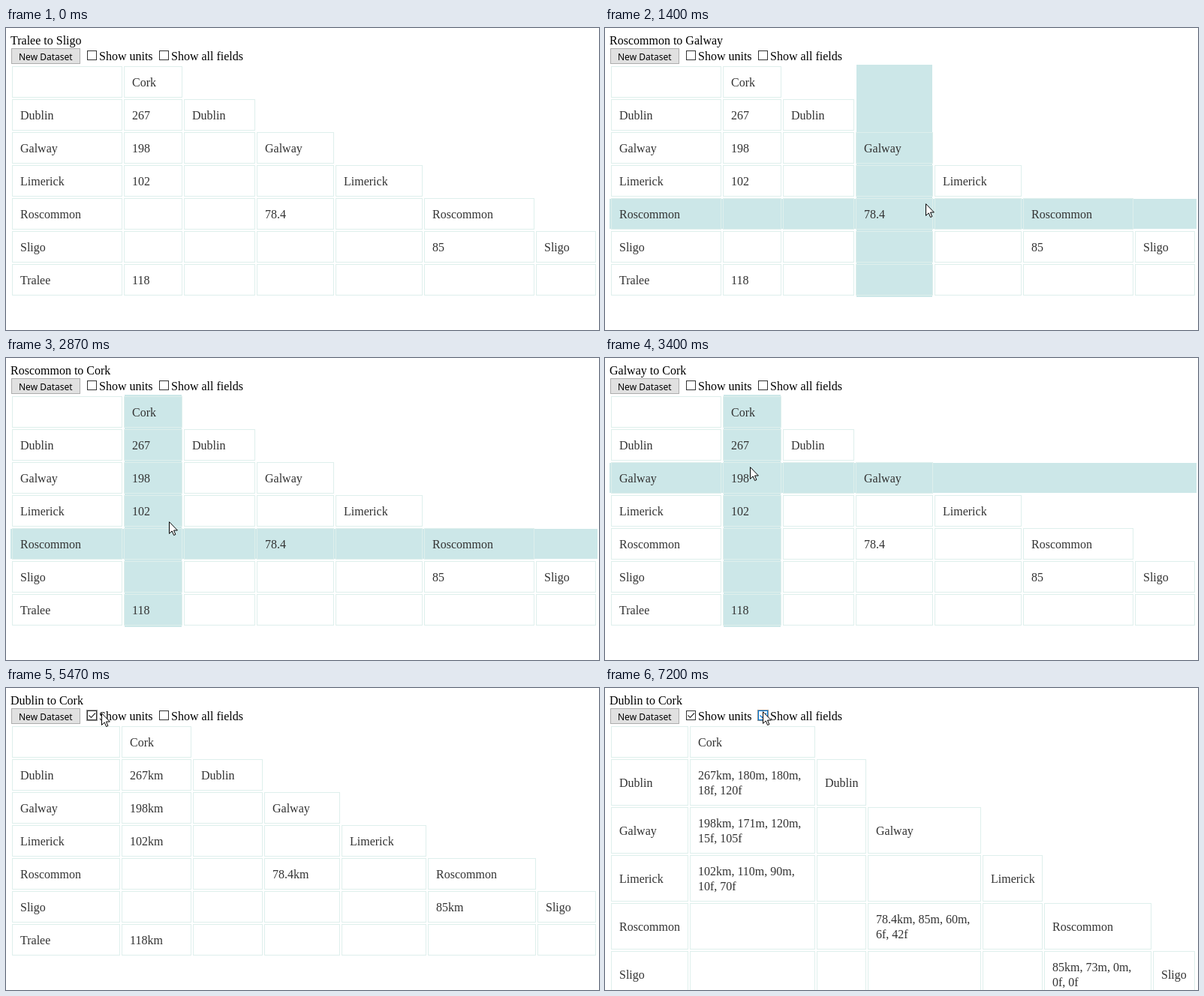
Animation, 790 px wide and 403 px high, one loop 8 s. Source, as an HTML page:

```html
<!DOCTYPE html>
<html lang="en">
<head>
<meta charset="utf-8">
<title>Distance table</title>
<style>
html, body { margin: 0; width: 100%; height: 100%; overflow: hidden; background: #fff; }
svg { display: block; font: 16px "Liberation Serif", "Times New Roman", serif; }
text { white-space: pre; }
.cell { fill: none; stroke: #deefec; }
.label { fill: #333; }
.glow { fill: #cce7e8; }
.button { font: 12px "Noto Sans", sans-serif; }
</style>
</head>
<body>
<svg id="stage" width="790" height="403" viewBox="0 0 790 403"></svg>
<script>
const LOOP = 8000;
const UNITS_PRESS = 4870, UNITS_ON = 4930, FIELDS_PRESS = 7070, FIELDS_ON = 7200;
const towns = ['Cork', 'Dublin', 'Galway', 'Limerick', 'Roscommon', 'Sligo', 'Tralee'];

// Keyed by row,column: short value, then the remaining fields
const distances = {
  '1,1': ['267', ' 180m, 180m,', '18f, 120f'],
  '2,1': ['198', ' 171m, 120m,', '15f, 105f'],
  '3,1': ['102', ' 110m, 90m,', '10f, 70f'],
  '4,3': ['78.4', ' 85m, 60m,', '6f, 42f'],
  '5,5': ['85', ' 73m, 0m,', '0f, 0f'],
  '6,1': ['118', ' 120m, 90m,', '12f, 80f']
};

// Column starts for each view; the last entry is the table's right edge
const views = {
  plain: { cols: [8, 157, 237, 334, 439, 557, 706, 788], height: 42 },
  units: { cols: [8, 154, 249, 344, 447, 562, 708, 788], height: 42 },
  full: { cols: [8, 113, 282, 350, 503, 585, 730, 788], height: 62 }
};
const TOP = 51, GAP = 2;
const rowTop = (view, r) => r ? TOP + 44 + (r - 1) * (view.height + GAP) : TOP;

// Pointer moves: start, end, steps, target x, target y, upward bow
const moves = [
  [530, 670, 3, 576, 75, 0],
  [1070, 1400, 6, 427, 234, 0],
  [1600, 1800, 4, 350, 241, 0],
  [2130, 2470, 6, 222, 240, 0],
  [2870, 3200, 6, 205, 169, 0],
  [3400, 3530, 3, 183, 126, 0],
  [3930, 4070, 3, 147, 50, 0],
  [4130, 4670, 9, 113, 35, 0],
  [5470, 6270, 13, 208, 31, 9],
  [6400, 6470, 2, 210, 31, 0]
];

function dataCellAt(x, y) {
  const { cols, height } = views.plain;
  const c = cols.findIndex((left, i) => i < 7 && x >= left && x < cols[i + 1] - GAP);
  const r = towns.findIndex((_, i) => y >= rowTop(views.plain, i) && y < rowTop(views.plain, i) + height);
  return c >= 1 && r >= c ? { r, c } : null;
}

function buildStates() {
  let title = 'Tralee to Sligo', last = { x: 992, y: 12 };
  const states = [{ t: 0, title, hover: null, visible: false }];
  for (const [start, end, steps, toX, toY, bow] of moves) {
    const from = last;
    for (let i = 0; i < steps; i++) {
      const k = 1 - (1 - (i + 1) / steps) ** 2;
      const x = Math.round(from.x + (toX - from.x) * k);
      const y = Math.round(from.y + (toY - from.y) * k - bow * Math.sin(Math.PI * k) ** 2);
      // Highlighting trails the pointer by one step
      const hover = start < UNITS_ON ? dataCellAt(last.x, last.y) : null;
      if (hover) title = `${towns[hover.r]} to ${towns[hover.c - 1]}`;
      const t = Math.round((start + (end - start) * i / (steps - 1)) / 10) * 10;
      last = { t, x, y, hover, title, visible: true };
      states.push(last);
    }
  }
  return states;
}

const rect = (x, y, w, h, attrs) => `<rect x="${x}" y="${y}" width="${w}" height="${h}" ${attrs}/>`;
const text = (x, y, str, cls = '') => `<text x="${x}" y="${y}" class="${cls}">${str}</text>`;

function cellLines(r, c, mode) {
  if (c === 0) return r ? [towns[r]] : [];
  if (c === r + 1) return [towns[r]];
  const entry = distances[`${r},${c}`];
  if (!entry) return [];
  const [value, rest, second] = entry;
  if (mode === 'plain') return [value];
  return mode === 'units' ? [value + 'km'] : [`${value}km,${rest}`, second];
}

function drawTable(mode, hover) {
  const view = views[mode], { cols } = view;
  let out = '';
  if (hover) {
    const left = cols[hover.c], right = cols[hover.c + 1] - GAP;
    out += rect(6, rowTop(view, hover.r) + 1, 782, view.height - 2, 'class="glow"');
    out += rect(left + 1, 49, right - left - 2, 310, 'class="glow"');
  }
  towns.forEach((_, r) => {
    const y = rowTop(view, r), h = r ? view.height : 42;
    for (let c = 0; c < Math.min(r + 2, 7); c++) {
      const x = cols[c], w = cols[c + 1] - GAP - x;
      out += rect(x + .5, y + .5, w - 1, h - 1, 'class="cell"');
      const lines = cellLines(r, c, mode);
      const base = y + h / 2 + 6 - (lines.length - 1) * 10;
      lines.forEach((line, i) => out += text(x + 11, base + i * 20, line, 'label'));
    }
  });
  return out;
}

function drawCheckbox(x, { checked, pressed, focused, hovered }) {
  const ink = pressed ? '#005499' : hovered ? '#0078d7' : '#333';
  let out = rect(x + .5, 30.5, 12, 12, `fill="${pressed ? '#cce4f7' : '#fff'}" stroke="${ink}"`);
  if (checked) out += `<path d="M${x + 2.5} 36.5l3 3 5.5-6" fill="none" stroke="${ink}" stroke-width="1.2"/>`;
  if (focused) out += rect(x - .5, 29.5, 14, 14, 'fill="none" stroke="#222" stroke-dasharray="1"');
  return out;
}

function drawControls(t, { x, y, visible }) {
  const over = left => visible && x >= left && x < left + 13 && y >= 30 && y < 43;
  return rect(7.5, 27.5, 91, 20, 'fill="#e1e1e1" stroke="#adadad"') +
    text(17, 43, 'New Dataset', 'button') +
    drawCheckbox(108, {
      checked: t >= UNITS_ON, pressed: t >= UNITS_PRESS && t < UNITS_ON,
      focused: t >= UNITS_PRESS && t < FIELDS_PRESS, hovered: over(108)
    }) +
    text(124, 43, 'Show units') +
    drawCheckbox(204, {
      checked: t >= FIELDS_ON, pressed: t >= FIELDS_PRESS && t < FIELDS_ON,
      focused: t >= FIELDS_PRESS, hovered: over(204)
    }) +
    text(220, 43, 'Show all fields');
}

const drawPointer = ({ x, y }) =>
  `<path transform="translate(${x} ${y})" d="M.5 .7V16.4L4.2 12.9 6.6 18.5 8.9 17.5 6.5 12H11.4Z" fill="#fff" stroke="#000"/>`;

const stage = document.getElementById('stage');
const states = buildStates();
const changes = [UNITS_PRESS, UNITS_ON, FIELDS_PRESS, FIELDS_ON];
let shown = '';

function render(t) {
  const index = states.findLastIndex(s => s.t <= t);
  const key = index + ':' + changes.filter(c => c <= t).length;
  if (key === shown) return;
  shown = key;
  const state = states[index];
  const mode = t >= FIELDS_ON ? 'full' : t >= UNITS_ON ? 'units' : 'plain';
  stage.innerHTML = drawTable(mode, state.hover) + text(6, 22, state.title) +
    drawControls(t, state) + (state.visible ? drawPointer(state) : '');
}

const begin = performance.now();
function tick() {
  render((performance.now() - begin) % LOOP);
  requestAnimationFrame(tick);
}
tick();
</script>
</body>
</html>
```
